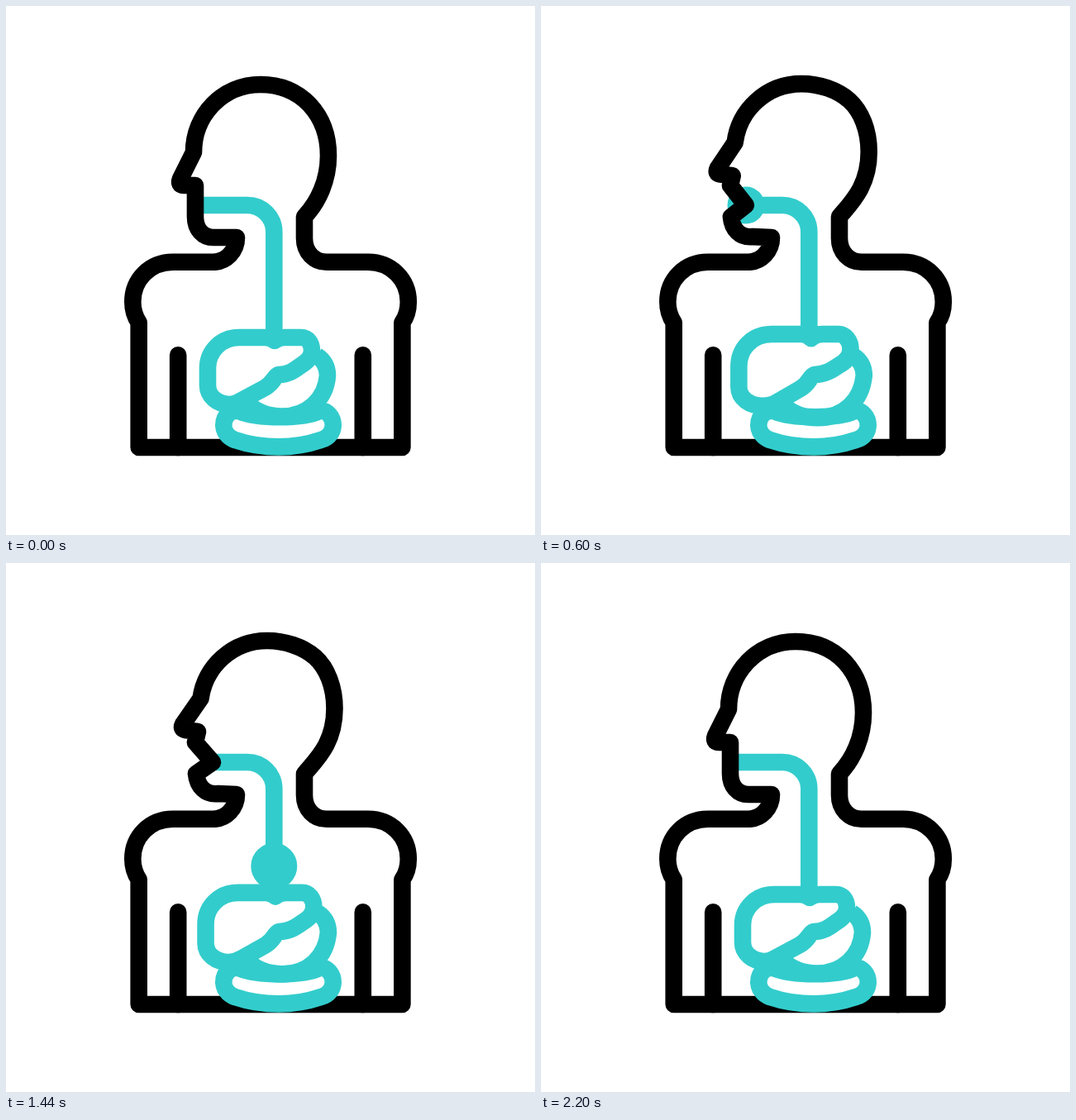
These frames come from a looping animation (640 px wide and 640 px high, 2.4 s). An HTML page:

```html
<!DOCTYPE html>
<html lang="en">
<head>
<meta charset="utf-8">
<title>Digestion</title>
<style>
  html, body { margin: 0; width: 100%; height: 100%; overflow: hidden; background: #fff; }
  svg { display: block; width: 100%; height: 100%; }
  path, circle { fill: none; stroke-width: 20.6; stroke-linejoin: round; }
  .body { stroke: #000; stroke-linecap: round; }
  .gut { stroke: #33cccc; }
</style>
</head>
<body>
<svg viewBox="0 0 640 640">
  <path id="route" d="M150 241H292A32.3 32.3 0 0 1 324.3 273V425" style="stroke:none"/>
  <circle id="bite" class="gut"/>
  <path id="gullet" class="gut"/>
  <path id="figure" class="body"/>
  <path class="body" d="M208.2 422.2V534M431.8 422.2V534"/>
  <path id="duodenum" class="gut"/>
  <path id="stomach" class="gut"/>
  <path class="gut" d="M282 490C270 488 263.3 498 263.3 507C263.3 515 269 522 277 525Q302 533.4 330 533.4Q356 533.4 381 525C391 522 395.7 515 395.7 507C395.7 498 389 488 379 490C371 494 357 497.2 332 497.2C307 497.2 291 494 282 490Z"/>
</svg>
<script>
const LOOP = 2400, STEP = 20;
const el = id => document.getElementById(id);

const torso = "C279 296 267 309.8 250 309.8L202 309.8C174 309.8 153.3 331 153.3 358C153.3 368 156 376 160.7 383L160.7 534L479.4 534L479.4 383C484.5 376 486.8 368 486.8 358C486.8 331 466 309.8 438 309.8L388 309.8C373 309.8 361 298 361 281Z";
const head = {
  closed: "M361 255C378 237 390 211 390 181C390 156 381.5 134.5 367 119C352.5 104 332 95 308 95C262 95 227 132 227 177L211 209Q208 217 215 217L229 217L229 219L229 241L229 255C229 270 238 280 251 280L279 280" + torso,
  open: "M361 255C376 237 397.5 218 397.5 176C397.5 150 388.5 127 374 114C359 101 337 94 316 94C274 94 241 125 235.5 164L214 195Q211 201 217 202L232 204L229 217L250 241L230 255C231.5 270 241 281 257 279L279 280" + torso
};
const stomach = {
  rest: "M325 405Q320 401 313 401L282 401C260 401 244 418 244 438L244 459C244 472 256 482 270 482C275 482 280 480 285 477L313 462C324 456 324 448 330 446C344 446 352 438 358 434C366 429 370 424 370 417C370 408 365 401 357 401L337 401Q330 401 325 405Z",
  full: "M327 402Q322 396.5 315 396.5L279 396.5C255 396.5 238.8 414 238.8 436L238.8 461C238.8 475 252 484 268 484C274 484 280 483 285 480L314 463C325 457 325 448 331 446C346 446 355 438 362 434C371 429 375 423 375 415C375 404 368 396.5 360 396.5L341 396.5Q332 396.5 327 402Z"
};
const duodenum = {
  rest: "M376 423C385 429 389 438 389 447C387 475 365 496.5 334 496.5C317 496.5 300 490 292 480",
  full: "M378 423C387 429 391 438 391 447C388 477 367 498.5 335 498.5C317 498.5 301 492 292 481"
};

const lerp = (a, b, p) => a + (b - a) * p;
const clamp = p => Math.min(1, Math.max(0, p));
const ease = (t, from, to) => {
  const p = clamp((t - from) / (to - from));
  return p * p * (3 - 2 * p);
};

// Blends two paths that share the same commands.
function morph(a, b, p) {
  const ends = b.match(/[\d.]+/g);
  let i = 0;
  return a.replace(/[\d.]+/g, n => lerp(+n, +ends[i++], p).toFixed(2));
}

// Piecewise linear value through [time, value] keys.
function track(keys, t) {
  const i = keys.findIndex(k => k[0] > t);
  if (i < 0) return keys[keys.length - 1][1];
  if (i === 0) return keys[0][1];
  const [t0, v0] = keys[i - 1], [t1, v1] = keys[i];
  return lerp(v0, v1, (t - t0) / (t1 - t0));
}

const travel = [[120, 17], [240, 34.5], [600, 98], [1100, 207.3], [1440, 286.3], [1680, 334]];

function biteRadius(t) {
  const squeeze = ease(t, 320, 600) * (1 - ease(t, 620, 860));
  return 28 * ease(t, 100, 265) * (1 - ease(t, 1450, 1680)) - 5.5 * squeeze;
}

function draw(t) {
  const mouth = ease(t, 200, 700) * (1 - ease(t, 1480, 1780));
  const swell = ease(t, 200, 700) - ease(t, 700, 1200) + ease(t, 1200, 1700) - ease(t, 1700, 2200);

  el("figure").setAttribute("d", morph(head.closed, head.open, mouth));
  el("stomach").setAttribute("d", morph(stomach.rest, stomach.full, swell));
  el("duodenum").setAttribute("d", morph(duodenum.rest, duodenum.full, swell));
  el("gullet").setAttribute("d", `M${lerp(229, 250, mouth)} 241H292A32.3 32.3 0 0 1 324.3 273V402`);

  const bite = el("bite");
  const radius = t < 120 ? 0 : biteRadius(t);
  const hole = Math.max(0, radius - 20.6);
  const at = el("route").getPointAtLength(track(travel, t));
  bite.setAttribute("cx", at.x);
  bite.setAttribute("cy", at.y);
  bite.setAttribute("r", (radius + hole) / 2);
  bite.style.strokeWidth = radius - hole;
  bite.style.display = radius > 0.1 ? "" : "none";
}

const start = performance.now();
function tick() {
  const t = (performance.now() - start) % LOOP;
  draw(t - t % STEP);
  requestAnimationFrame(tick);
}
tick();
</script>
</body>
</html>
```
